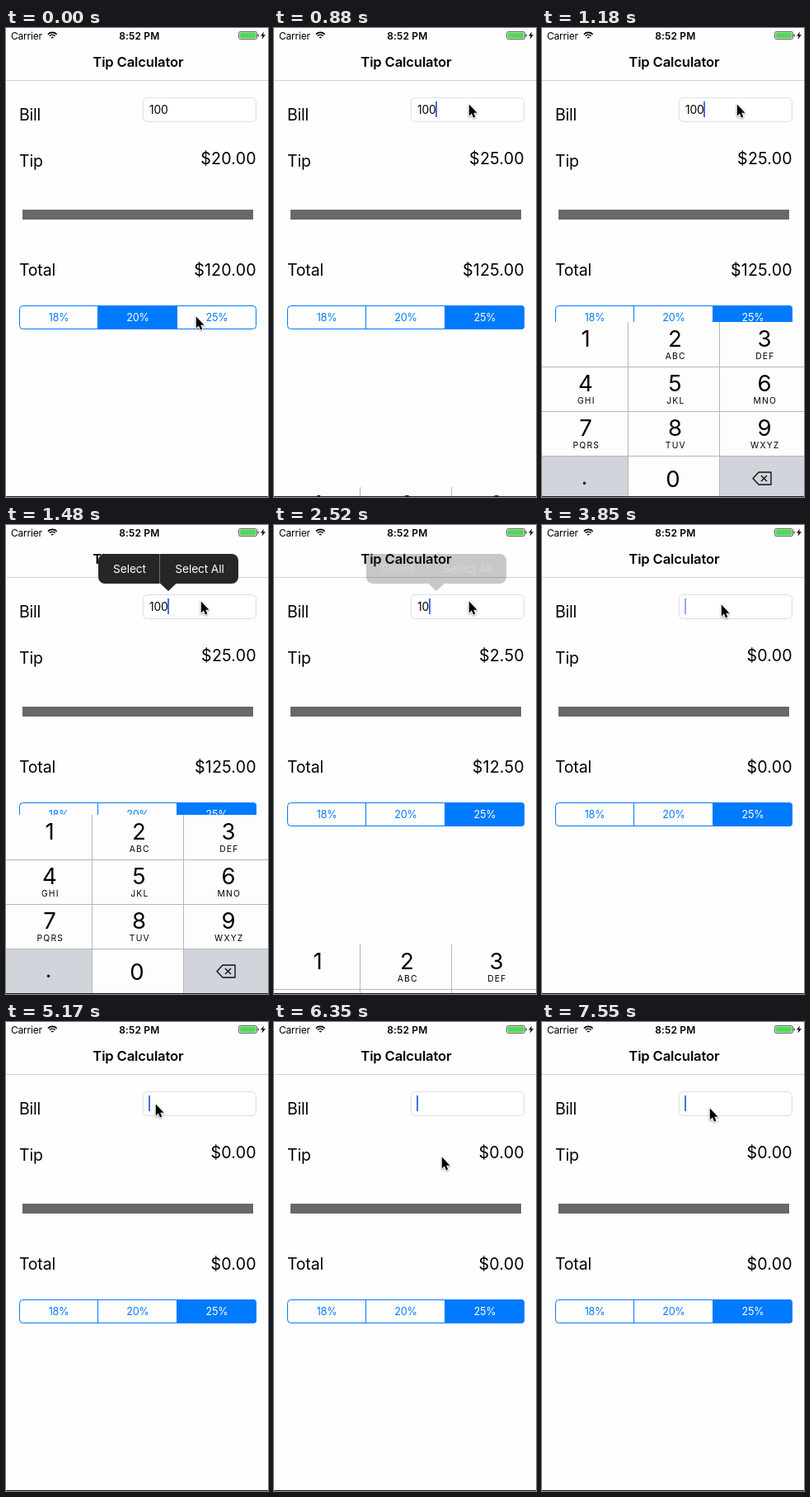
Recreate the animation shown at these times as an HTML page with a canvas. Size 318 by 568 pixels, loop 8000 ms.

```html
<!DOCTYPE html>
<html lang="en">
<head>
<meta charset="utf-8">
<title>Tip Calculator</title>
<style>
html, body { margin: 0; width: 100%; height: 100%; overflow: hidden; background: #fff; }
canvas { display: block; width: 318px; height: 568px; }
</style>
</head>
<body>
<canvas id="stage"></canvas>
<script>
const W = 318, H = 568, LOOP = 8000, TICK = 148;
const FONT = 'Inter, "Open Sans", sans-serif';
const BLUE = '#007aff', LINE = '#b4b6ba';
const RATES = [0.18, 0.2, 0.25];
const KEYS = ['', 'ABC', 'DEF', 'GHI', 'JKL', 'MNO', 'PQRS', 'TUV', 'WXYZ'];
const canvas = document.getElementById('stage');
const ctx = canvas.getContext('2d');
const dpr = window.devicePixelRatio || 1;
canvas.width = W * dpr;
canvas.height = H * dpr;

// Ticks of the main actions
const TAP = 6, MENU = 10, TYPE = 17, PRESS = 37;
// Pointer moves: start tick, end tick, goal
const HOME = [230, 349];
const MOVES = [
  [1, 4, 236, 92], [20, 24, 217, 96], [27, 35, 181, 99],
  [38, 41, 215, 140], [41, 43, 203, 163], [44, 47, 203, 104]
];

const clamp = (v, lo, hi) => Math.min(hi, Math.max(lo, v));

function pointerAt(k) {
  let [x, y] = HOME;
  for (const [from, to, gx, gy] of MOVES) {
    const f = clamp((k - from) / (to - from), 0, 1), e = f * f * (3 - 2 * f);
    x += (gx - x) * e;
    y += (gy - y) * e;
  }
  return [x, y];
}

// Steady after each touch, then a short dip every seven ticks
function caretAt(k) {
  if (k < TAP) return 0;
  const idle = k - Math.max(...[TAP, TYPE + 1, PRESS].filter(at => at <= k));
  const phase = idle < 8 ? 2 : (idle - 8) % 7;
  return phase === 0 ? 0.6 : phase === 1 ? 0 : 1;
}

function menuAt(k) {
  if (k < MENU || k > TYPE) return 0;
  return k === TYPE ? 0.25 : 1;
}

const billAt = k => '100'.slice(0, 3 - clamp(k - TYPE + 1, 0, 3));

function spring(ms) {
  const x = Math.max(0, ms) * 0.018;
  return 1 - (1 + x) * Math.exp(-x);
}

const keyboardAt = k => spring((k - TAP) * TICK + 21) - spring((k - TYPE) * TICK + 142);

function rect(x, y, w, h, color) {
  ctx.fillStyle = color;
  ctx.fillRect(x, y, w, h);
}

function text(str, x, y, size, { color = '#000', align = 'left', weight = 400, gap = -0.2 } = {}) {
  ctx.font = `${weight} ${size}px ${FONT}`;
  ctx.letterSpacing = gap + 'px';
  ctx.textAlign = align;
  ctx.fillStyle = color;
  ctx.fillText(str, x, y);
}

function path(points) {
  ctx.beginPath();
  points.forEach(([x, y]) => ctx.lineTo(x, y));
  ctx.closePath();
}

function box(x, y, w, h, r) {
  ctx.beginPath();
  ctx.roundRect(x, y, w, h, r);
}

function statusBar() {
  text('Carrier', 6, 14, 12);
  ctx.strokeStyle = '#000';
  ctx.lineWidth = 1.6;
  for (const r of [1.5, 4.7, 7.6]) {
    ctx.beginPath();
    ctx.arc(56.3, 13, r, -Math.PI * 0.75, -Math.PI * 0.25);
    ctx.stroke();
  }
  text('8:52 PM', 161.8, 14, 12, { align: 'center', weight: 600, gap: 0.15 });
  ctx.lineWidth = 1;
  ctx.strokeStyle = '#666';
  box(282.5, 4.5, 22, 9, 1.8);
  ctx.stroke();
  rect(283.5, 5.5, 20, 7, '#53d65b');
  rect(305.5, 7.5, 1.3, 3, '#444');
  path([[313, 4.5], [309, 9.6], [311.6, 9.6], [310.5, 13.5], [315, 8.2], [312.2, 8.2]]);
  ctx.fillStyle = '#000';
  ctx.fill();
}

function segments(active) {
  ctx.save();
  box(16, 336, 288, 29, 4);
  ctx.clip();
  rect(15 + active * 96, 336, 97, 29, BLUE);
  ctx.restore();
  ctx.strokeStyle = BLUE;
  ctx.lineWidth = 1;
  box(16.5, 336.5, 287, 28, 4);
  ctx.stroke();
  RATES.forEach((rate, i) => {
    if (i) rect(15 + i * 96, 336, 1, 29, BLUE);
    text(rate * 100 + '%', 64 + i * 96, 355, 12.6, { align: 'center', color: i === active ? '#fff' : BLUE });
  });
}

function form(bill, active, caret) {
  const amount = Number(bill), rate = RATES[active];
  const money = (v, y) => text('$' + v.toFixed(2), 303.8, y, 19.6, { align: 'right', gap: 0.2 });
  text('Bill', 16, 112, 19.5);
  text('Tip', 16, 168, 19.5);
  text('Total', 16, 300, 19.5);
  money(amount * rate, 165);
  money(amount * (1 + rate), 300);
  box(166.5, 84.5, 137, 29, 5);
  ctx.fillStyle = '#fff';
  ctx.fill();
  ctx.strokeStyle = '#dedede';
  ctx.lineWidth = 1;
  ctx.stroke();
  text(bill, 174, 104, 13.8, { gap: -0.1 });
  ctx.globalAlpha = caret;
  rect(Math.round(173 + bill.length * 7.7), 89, 2, 19, '#4a6ee0');
  ctx.globalAlpha = 1;
  rect(20, 220, 280, 12, '#686868');
  segments(active);
}

function keyboard(shown) {
  if (shown < 0.002) return;
  const digit = { align: 'center', gap: 0 };
  ctx.save();
  ctx.translate(0, Math.round(H - 217 * shown));
  rect(0, 0, W, 217, '#fdfdfd');
  rect(0, 163, 104, 54, '#d1d4db');
  rect(216, 163, 102, 54, '#d1d4db');
  for (const x of [104, 215]) rect(x, 0, 1, 217, LINE);
  for (const row of [1, 2, 3]) rect(0, row * 54, W, 1, LINE);
  KEYS.forEach((letters, i) => {
    const x = 53 + (i % 3) * 108.5, y = Math.floor(i / 3) * 54;
    text(String(i + 1), x, y + 29.5, 27.5, digit);
    text(letters, x + 0.8, y + 45, 10.3, { align: 'center', gap: 1.2 });
  });
  text('0', 159, 199.5, 27.5, digit);
  text('.', 51.5, 197, 26, digit);
  ctx.strokeStyle = '#111';
  ctx.lineWidth = 1.4;
  ctx.lineJoin = 'round';
  path([[256, 189.5], [263, 182], [278, 182], [278, 197], [263, 197]]);
  ctx.stroke();
  ctx.beginPath();
  ctx.moveTo(266, 186); ctx.lineTo(273, 193);
  ctx.moveTo(273, 186); ctx.lineTo(266, 193);
  ctx.stroke();
  ctx.restore();
}

function menu(alpha) {
  if (!alpha) return;
  const label = { align: 'center', color: '#fff', gap: -0.1 };
  ctx.globalAlpha = alpha;
  box(112, 35, 170, 36, 8);
  ctx.moveTo(187.5, 71);
  ctx.lineTo(206.5, 71);
  ctx.lineTo(197, 80);
  ctx.closePath();
  ctx.fillStyle = '#262626';
  ctx.fill();
  rect(186, 35, 1, 36, 'rgba(255,255,255,0.35)');
  text('Select', 150, 58, 13.7, label);
  text('Select All', 235, 58, 13.7, label);
  ctx.globalAlpha = 1;
}

function pointer(x, y) {
  ctx.save();
  ctx.translate(x + 0.3, y);
  ctx.scale(0.95, 0.95);
  path([[0.5, 0.5], [0.5, 15.2], [3.8, 12.2], [6, 17.3], [8.4, 16.3], [6.3, 11.3], [10.8, 11.2]]);
  ctx.lineJoin = 'round';
  ctx.shadowColor = 'rgba(0,0,0,0.4)';
  ctx.shadowBlur = 2 * dpr;
  ctx.shadowOffsetY = dpr;
  ctx.strokeStyle = '#fff';
  ctx.lineWidth = 2;
  ctx.stroke();
  ctx.shadowColor = 'transparent';
  ctx.fillStyle = '#000';
  ctx.fill();
  ctx.restore();
}

function draw(time) {
  // The screen refreshes in fixed steps
  const k = Math.floor((time + 15) / TICK);
  ctx.setTransform(dpr, 0, 0, dpr, 0, 0);
  rect(0, 0, W, H, '#fefefe');
  rect(0, 63, W, 1, '#d2d2d2');
  statusBar();
  text('Tip Calculator', 160.4, 47, 16.6, { align: 'center', weight: 600, gap: -0.13 });
  form(billAt(k), k < 1 ? 1 : 2, caretAt(k));
  keyboard(keyboardAt(k));
  menu(menuAt(k));
  pointer(...pointerAt(k));
  rect(0, 567, W, 1, '#1c1c1c');
}

const start = performance.now();
function loop() {
  draw((performance.now() - start) % LOOP);
  requestAnimationFrame(loop);
}
loop();
</script>
</body>
</html>
```
